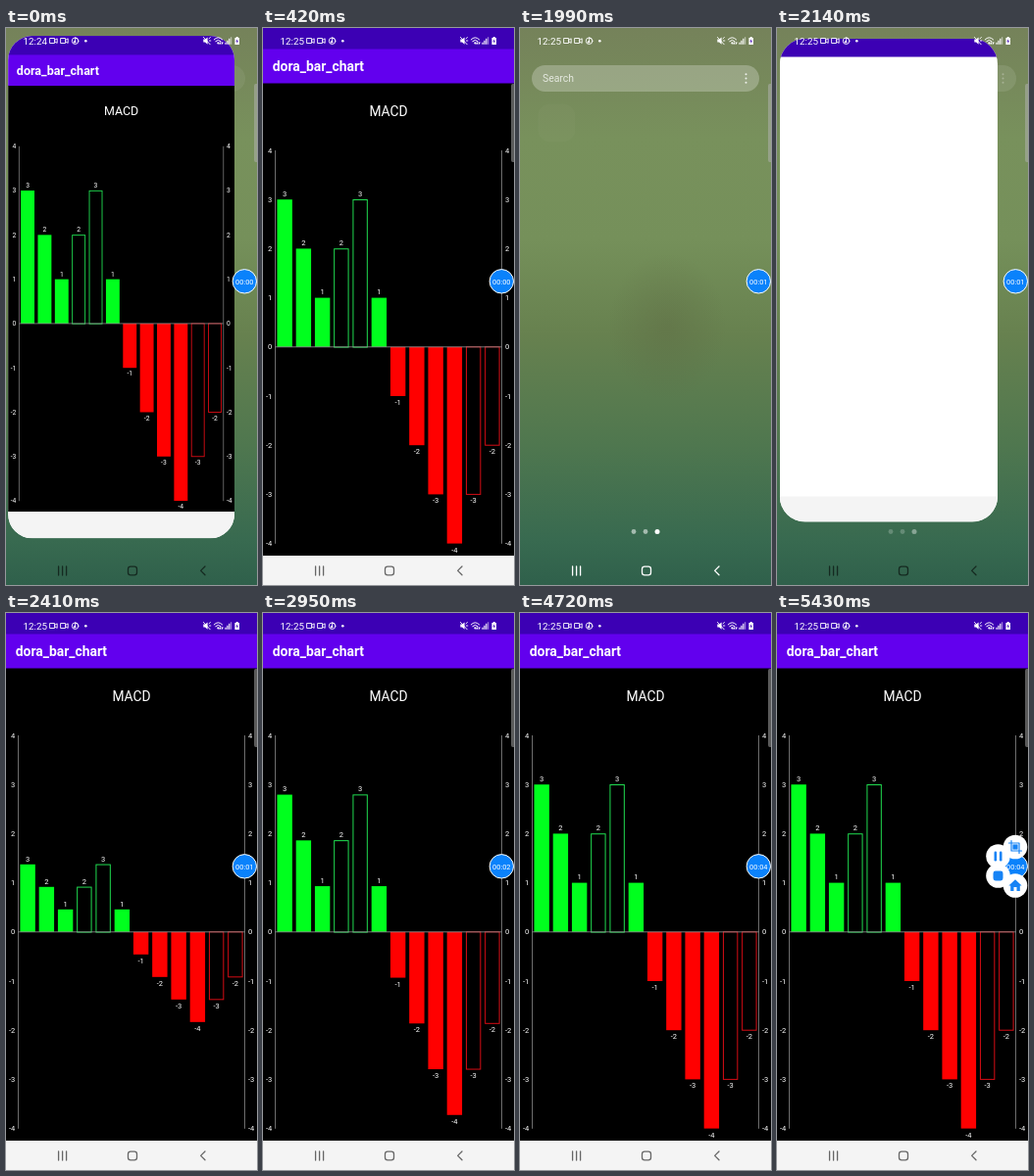
Animation, 256 px wide and 569 px high, one loop 5.47 s. Source, as an HTML page:

```html
<!DOCTYPE html>
<html lang="en">
<head>
<meta charset="utf-8">
<title>Bar chart demo</title>
<style>
  html, body { margin: 0; width: 100%; height: 100%; overflow: hidden; background: #000; }
  svg { display: block; width: 100vw; height: 100vh; font-family: Roboto, "Open Sans", sans-serif; }
  .mid { text-anchor: middle; }
  .end { text-anchor: end; }
  .line { fill: none; stroke-linecap: round; stroke-linejoin: round; }
</style>
</head>
<body>
<svg viewBox="0 0 256 569" preserveAspectRatio="none">
  <defs>
    <linearGradient id="wall" x1="0" y1="0" x2="0" y2="1">
      <stop offset="0" stop-color="#75825a"/>
      <stop offset=".2" stop-color="#78915c"/>
      <stop offset=".38" stop-color="#75905a"/>
      <stop offset=".55" stop-color="#67814f"/>
      <stop offset=".75" stop-color="#4f774f"/>
      <stop offset=".92" stop-color="#386a50"/>
      <stop offset="1" stop-color="#2f604b"/>
    </linearGradient>
    <radialGradient id="spot">
      <stop offset="0" stop-color="#5b6540" stop-opacity=".35"/>
      <stop offset="1" stop-color="#5b6540" stop-opacity="0"/>
    </radialGradient>
    <clipPath id="frame"><rect id="crop"/></clipPath>
  </defs>

  <rect width="256" height="569" fill="url(#wall)"/>
  <ellipse cx="150" cy="305" rx="60" ry="75" fill="url(#spot)"/>

  <g id="home" fill="#fff">
    <rect x="12" y="38" width="232" height="27" rx="13.5" fill-opacity=".25"/>
    <text x="23" y="55.4" font-size="10.4" fill-opacity=".75">Search</text>
    <g fill-opacity=".85">
      <circle cx="230.5" cy="47.3" r="1"/><circle cx="230.5" cy="51.5" r="1"/><circle cx="230.5" cy="55.7" r="1"/>
    </g>
    <circle cx="116" cy="514.5" r="2.4" fill-opacity=".55"/>
    <circle cx="128" cy="514.5" r="2.4" fill-opacity=".55"/>
    <circle cx="140" cy="514.5" r="2.5"/>
  </g>

  <g id="win" clip-path="url(#frame)">
    <g id="page">
      <rect width="256" height="569" fill="#fff"/>
      <g id="app">
        <rect y="56" width="256" height="483" fill="#000"/>
        <rect y="21" width="256" height="35.5" fill="#6200ee"/>
        <text x="9.7" y="44.4" font-size="13.9" font-weight="600" fill="#fff">dora_bar_chart</text>
        <text x="128" y="90" font-size="13.8" fill="#fff" class="mid">MACD</text>
        <g id="chart"></g>
      </g>
      <rect width="256" height="21.5" fill="#3c00b4"/>
      <rect y="539" width="256" height="30" fill="#f4f4f4"/>
    </g>
  </g>

  <g fill="#fff">
    <text id="clock" x="17.5" y="16.7" font-size="9.8"></text>
    <g class="line" stroke="#fff" stroke-width=".9">
      <path d="M45 10.5h4.6v5H45zM49.6 12.4l2.6-1.6v4.6l-2.6-1.6"/>
      <path d="M56 10.5h4.6v5H56zM60.6 12.4l2.6-1.6v4.6l-2.6-1.6"/>
      <circle cx="70.6" cy="13.2" r="3.3"/>
      <path d="M70.6 14.2v-4.4l2 1.2"/>
    </g>
    <circle cx="70" cy="14.2" r="1.2"/>
    <circle cx="81.3" cy="13.3" r="1.3"/>
    <path d="M201.3 11.6h1.8l2.5-2.2v7.4l-2.5-2.2h-1.8z"/>
    <path class="line" stroke="#fff" stroke-width=".9" d="M201.4 9.4l6.8 7.4M207 10.8l1.4-1.2M207.4 13h1.4"/>
    <path class="line" stroke="#fff" stroke-width="1" d="M212.2 11.9q4.2-4.4 8.4 0M213.7 13.6q2.7-2.7 5.4 0"/>
    <circle cx="216.4" cy="15.4" r="1.1"/>
    <path d="M218.4 14l1.2 2.6h-2.4zM220.6 17l-1.2-2.6h2.4z"/>
    <path d="M223.4 16.8h1.2v-2h-1.2zM225.3 16.8h1.2v-4h-1.2zM227.2 16.8h1.2v-6h-1.2z"/>
    <path d="M229 16.8h1.2v-7.6H229z" fill-opacity=".5"/>
    <path d="M234.7 9h2v1h1.3v7h-4.6v-7h1.3z"/>
    <path d="M235.9 11.2l-1.5 2.6h1.2l-.2 2.2 1.6-2.8h-1.2z" fill="#3c00b4"/>
  </g>

  <g id="nav" class="line" stroke-width="1.3">
    <path d="M53.6 550v9M57.6 550v9M61.6 550v9"/>
    <rect x="124.5" y="550.2" width="9" height="8.6" rx="2.6"/>
    <path d="M203 550l-4.4 4.4 4.4 4.4"/>
  </g>

  <path d="M256 57h-1.2q-1.8 0-1.8 2v76q0 2 1.8 2H256z" fill="#b4b4b4" fill-opacity=".5"/>

  <circle cx="243.3" cy="258.8" r="12.2" fill="#0a82fb" stroke="#fff" stroke-width="1"/>
  <text id="timer" x="243.3" y="261.5" font-size="7.4" fill="#fff" class="mid"></text>
  <g id="menu"></g>
</svg>

<script>
const $ = id => document.getElementById(id);
const LOOP = 5470, ZERO = 325.8, UNIT = 50.2, LEFT = 12.5, RIGHT = 243.5;
const SLOT = (RIGHT - LEFT) / 12;
// [value, hollow]
const DATA = [[3], [2], [1], [2, 1], [3, 1], [1], [-1], [-2], [-3], [-4], [-3, 1], [-2, 1]];

const clamp = v => Math.max(0, Math.min(1, v));
const mix = (a, b, k) => a + (b - a) * k;
const span = (t, a, b) => clamp((t - a) / (b - a));

// Piecewise linear lookup in [[x, y], ...]
function along(x, pts) {
  for (let i = 1; i < pts.length; i++) {
    const [a, va] = pts[i - 1], [b, vb] = pts[i];
    if (x <= b) return mix(va, vb, span(x, a, b));
  }
  return pts[pts.length - 1][1];
}

// Last entry of [[start, value], ...] that has begun
const latest = (t, rows) => rows.filter(r => r[0] <= t).pop()[1];

function put(el, attrs) {
  for (const k in attrs) el.setAttribute(k, attrs[k]);
}

function buildChart() {
  let out = '';
  for (const x of [LEFT, RIGHT])
    out += `<path d="M${x} 125V526.8" stroke="#8a8a8a" stroke-width=".8"/>`;
  for (let v = -4; v <= 4; v++) {
    const y = ZERO - v * UNIT + 2.6;
    out += `<text class="end" x="9.2" y="${y}">${v}</text><text x="247" y="${y}">${v}</text>`;
  }
  DATA.forEach(([v, hollow], i) => {
    const x = LEFT + SLOT * (i + .1), inset = hollow ? .5 : 0;
    const color = v > 0 ? '#00ff1e' : '#ff0000';
    const paint = hollow
      ? `fill="none" stroke="${v > 0 ? '#20dc50' : '#d80c14'}" stroke-width="1"`
      : `fill="${color}"`;
    out += `<rect class="bar" x="${x + inset}" width="${SLOT * .8 - inset * 2}" ${paint}/>`;
    out += `<text class="mid tag" x="${x + SLOT * .4}">${v}</text>`;
  });
  out += `<path d="M${LEFT} ${ZERO}H${RIGHT}" stroke="#9a9a9a" stroke-width=".8"/>`;
  $('chart').innerHTML = `<g fill="#fff" font-size="7.5">${out}</g>`;
}

const BUTTONS = [
  [243, 239, '<path class="line" stroke="#1683f5" stroke-width="1.2" d="M-4-6.5V4H6.5M-6.5-4H4V6.5"/><rect x="-2.6" y="-2.6" width="5.2" height="5.2"/>'],
  [225.5, 248.5, '<rect x="-4" y="-5" width="2.6" height="10" rx="1.2"/><rect x="1.4" y="-5" width="2.6" height="10" rx="1.2"/>'],
  [225.5, 268.5, '<rect x="-5" y="-5" width="10" height="10" rx="2.4"/>'],
  [243, 278.5, '<path d="M0-6.2L6.6 0H4.8V5.4H1.5V1.6H-1.5V5.4H-4.8V0H-6.6z"/>']
];

buildChart();
$('menu').innerHTML = BUTTONS.map(b =>
  `<g fill="#1683f5"><circle r="12.3" fill="#fff"/>${b[2]}</g>`).join('');
const bars = [...document.querySelectorAll('.bar')];
const tags = [...document.querySelectorAll('.tag')];
const buttons = [...$('menu').children];

function windowScale(t) {
  if (t < 780) return 1 - .098 * (1 - span(t, 40, 340)) ** 3;
  if (t < 1640) return along(t, [[780, 1], [1090, .461], [1290, .14]]);
  return 1 - .86 * (1 - span(t, 1990, 2394)) ** 4;
}

function drawWindow(t) {
  const s = windowScale(t);
  const closing = t > 780 && t < 1640;
  const k = closing ? span(s, .9, .5) : span(s, .6, .3);
  const x = 21.5 * (1 - s), y = 82 * (1 - s);
  const top = 52 * k, bottom = mix(569, 312, k);
  put($('page'), { transform: `translate(${x} ${y}) scale(${s})` });
  put($('crop'), {
    x, y: y + top * s, width: 256 * s, height: (bottom - top) * s,
    rx: along(s, [[.14, 12], [.461, 40], [.865, 26], [.98, 22], [1, 0]])
  });
  put($('win'), { opacity: along(t, [[1180, 1], [1290, 0], [1990, 0], [2030, 1]]) });
  put($('app'), { opacity: along(t, [[1500, 1], [1501, 0], [2230, 0], [2320, 1]]) });
}

function drawBars(t) {
  const grow = t < 1640 ? 1 : 1 - (1 - span(t, 2110, 3250)) ** 2;
  DATA.forEach(([v, hollow], i) => {
    const h = Math.abs(v) * UNIT * grow, y = v > 0 ? ZERO - h : ZERO;
    put(bars[i], { y: hollow && v > 0 ? y + .3 : y, height: h });
    put(tags[i], { y: v > 0 ? y - 3.2 : y + h + 9 });
  });
}

function drawMenu(t) {
  const p = span(t, 5375, 5428);
  put($('menu'), { visibility: p > 0 ? 'visible' : 'hidden' });
  buttons.forEach((b, i) => {
    const [x, y] = BUTTONS[i];
    put(b, { transform: `translate(${mix(243.3, x, p)} ${mix(258.8, y, p)}) scale(${mix(.3, 1, p)})` });
  });
}

function draw(t) {
  drawWindow(t);
  drawBars(t);
  drawMenu(t);
  put($('home'), { opacity: along(t, [[0, .25], [300, 0], [780, 0], [1000, 1], [1990, 1], [2140, .4], [2300, 0]]) });
  const light = t > 840 && t < 2030;
  put($('nav'), { stroke: light ? '#fff' : '#000', 'stroke-opacity': light ? 1 : .58 });
  $('clock').textContent = t < 280 ? '12:24' : '12:25';
  $('timer').textContent = '00:0' + latest(t, [[0, 0], [1000, 1], [2560, 2], [3750, 3], [4720, 4]]);
}

function tick() {
  draw(performance.now() % LOOP);
  requestAnimationFrame(tick);
}
tick();
</script>
</body>
</html>
```
